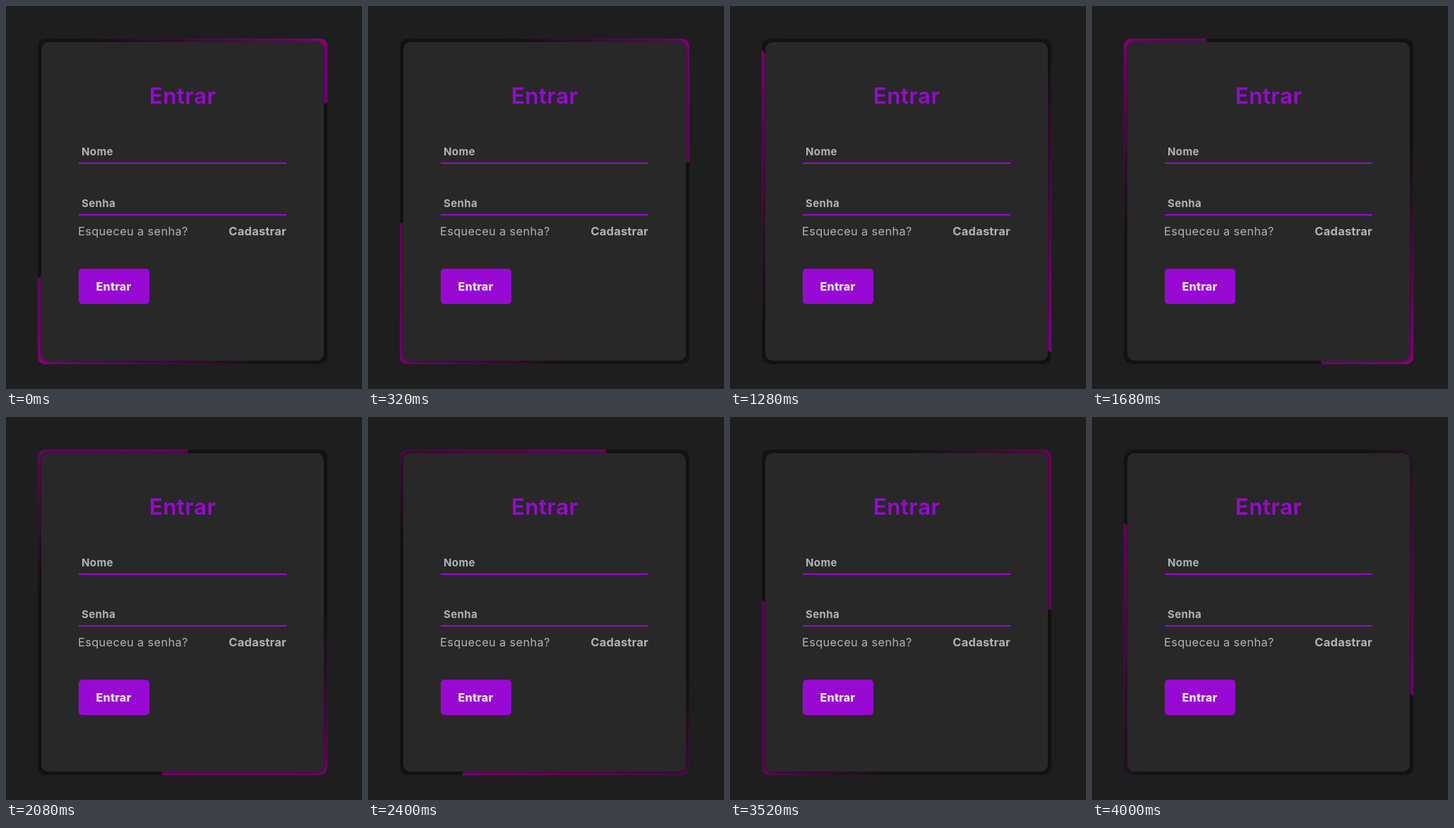
These frames come from a looping animation (504x541 px, 4080 ms). An HTML page:

```html
<!DOCTYPE html>
<html lang="pt">
<head>
<meta charset="utf-8">
<title>Entrar</title>
<style>
  html, body { margin: 0; width: 100%; height: 100%; overflow: hidden; background: #1e1e1e; }
  .box {
    position: absolute; left: 45px; top: 46px; width: 410px; height: 460px;
    border-radius: 10px; overflow: hidden; background: #161616;
  }
  .blade {
    position: absolute; left: -205px; top: -230px; width: 400px; height: 450px;
    background: linear-gradient(0deg, transparent, #c400b9);
    transform-origin: bottom right;
  }
  .panel {
    position: absolute; inset: 5px; border-radius: 10px;
    background: #282828; box-shadow: 0 0 10px rgba(0, 0, 0, .6);
  }
  svg { position: absolute; left: 0; top: 0; font: 16px Inter, sans-serif; fill: #b3b3b3; }
  .accent { fill: #9909d4; }
  .title { font-size: 31.5px; font-weight: 600; letter-spacing: .4px; }
  .label { font-size: 15px; font-weight: 700; letter-spacing: .4px; }
  .hint { font-size: 16.3px; letter-spacing: .4px; }
  .link { font-size: 16.5px; font-weight: 700; letter-spacing: .2px; }
  .button { font-weight: 800; letter-spacing: .2px; fill: #f6effa; }
</style>
</head>
<body>
<div class="box">
  <div class="blade"></div>
  <div class="blade"></div>
  <div class="panel"></div>
</div>
<svg width="504" height="541">
  <text class="title accent" x="250" y="138" text-anchor="middle">Entrar</text>
  <text class="label" x="107" y="211">Nome</text>
  <rect class="accent" x="103" y="221" width="294" height="2"/>
  <text class="label" x="107" y="284">Senha</text>
  <rect class="accent" x="103" y="294" width="294" height="2"/>
  <text class="hint" x="102" y="324">Esqueceu a senha?</text>
  <text class="link" x="397" y="324" text-anchor="end">Cadastrar</text>
  <rect class="accent" x="103" y="371" width="100" height="50" rx="5"/>
  <text class="button" x="152.5" y="402" text-anchor="middle">Entrar</text>
</svg>
<script>
  const LOOP = 4080, START = 58.8, SPEED = 0.0605; // ms, degrees, degrees per ms
  const blades = document.querySelectorAll('.blade');

  // 15 poses per second, aligned to a 40 ms clock
  const holdStart = t => t - t % 200 + [0, 0, 80, 120, 120][Math.floor(t % 200 / 40)];

  function draw(now) {
    const angle = START + SPEED * holdStart(now % LOOP);
    blades.forEach((blade, i) => {
      blade.style.transform = `rotate(${angle + 180 * i}deg)`;
    });
    requestAnimationFrame(() => draw(performance.now() - begin));
  }

  const begin = performance.now();
  draw(0);
</script>
</body>
</html>
```
